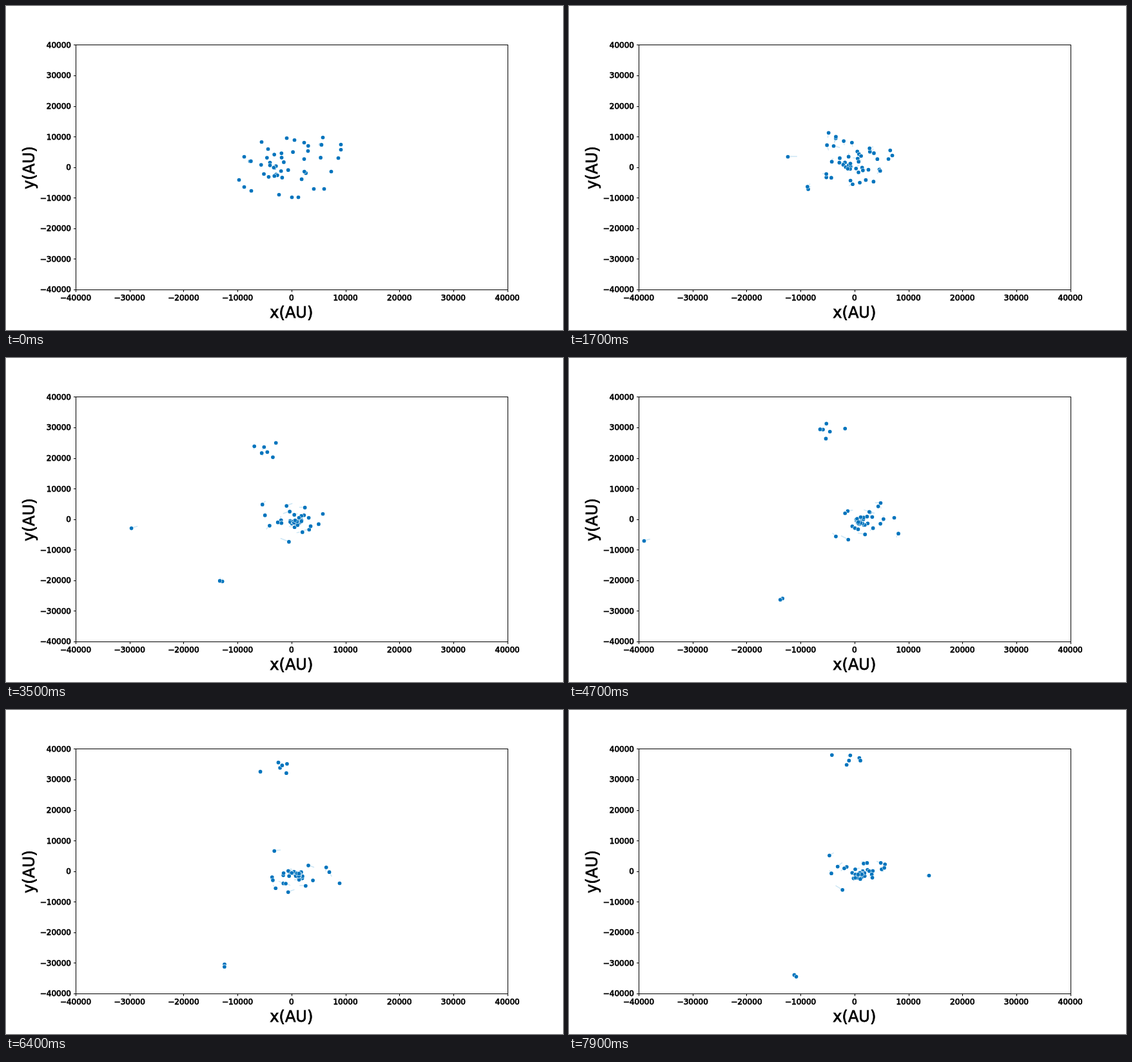
Recreate the animation shown at these times as an HTML page with a canvas. Size 864x504 px, loop 8000 ms.

```html
<!DOCTYPE html>
<html lang="en">
<head>
<meta charset="utf-8">
<title>Cluster collapse</title>
<style>
  html, body { margin: 0; width: 100%; height: 100%; overflow: hidden; background: #fff; }
  canvas { display: block; width: 864px; height: 504px; }
</style>
</head>
<body>
<canvas id="stage" width="864" height="504"></canvas>
<script>
const ctx = document.getElementById('stage').getContext('2d');
const LOOP = 8000, STEP = 100, TRAIL = 150;
const BOX = { l: 108, t: 60.48, w: 669.6, h: 380.52 };
const BLUE = '#0174bd';
const KNOT = [419, 247];
const INNER_STARS = 21;

// Outline of the cloud before it collapses.
const rim = [
  [519, 215], [515, 236], [504, 257], [493, 284], [477, 284], [453, 297], [443, 297],
  [423, 293], [380, 287], [369, 281], [361, 270], [369, 234], [396, 211], [406, 222],
  [435, 205], [447, 208], [462, 212], [488, 215], [491, 204]
];

let seed = 29;
function rand() {
  seed = (seed * 16807) % 2147483647;
  return seed / 2147483647;
}

const smooth = k => {
  k = Math.min(1, Math.max(0, k));
  return k * k * (3 - 2 * k);
};

// Smooth curve through [time, x, y] points, starting at rest.
function path(...pts) {
  const slope = (i, axis) => {
    if (i === 0) return 0;
    const a = pts[i - 1], b = pts[Math.min(i + 1, pts.length - 1)];
    return (b[axis] - a[axis]) / (b[0] - a[0]);
  };
  return t => {
    let i = 0;
    while (i < pts.length - 2 && t > pts[i + 1][0]) i++;
    const a = pts[i], b = pts[i + 1], d = b[0] - a[0];
    const u = (t - a[0]) / d, u2 = u * u, u3 = u2 * u;
    const at = axis =>
      (2 * u3 - 3 * u2 + 1) * a[axis] + (u3 - 2 * u2 + u) * d * slope(i, axis) +
      (3 * u2 - 2 * u3) * b[axis] + (u3 - u2) * d * slope(i + 1, axis);
    return [at(1), at(2)];
  };
}

function orbit(center, r, flat, phase, speed, skew = 0) {
  return t => {
    const [x, y] = center(t), a = phase + speed * t;
    return [x + r * Math.cos(a), y + r * flat * Math.sin(a + skew)];
  };
}

const core = t => {
  const drift = smooth((t - 1400) / 3000);
  return [438 + 13 * drift, 249 + 6 * drift];
};

// Falls from its start onto an orbit round the core; far stars take longer.
function boundStar(x, y) {
  const r = 3 + 62 * Math.pow(rand(), 1.8);
  const speed = (rand() < 0.5 ? -1 : 1) * 0.0105 / Math.sqrt(r);
  const round = orbit(core, r, 0.4 + 0.4 * rand(), rand() * 2 * Math.PI, speed, rand() * 1.6 - 0.8);
  const time = 1800 + 30 * Math.hypot(x - KNOT[0], y - KNOT[1]);
  return t => {
    const [ox, oy] = round(t), k = smooth(t / time);
    return [x + (ox - x) * k, y + (oy - y) * k];
  };
}

function makeStars() {
  const loner = path([0, 378, 241], [950, 405, 240], [1700, 339, 234],
    [2600, 257, 249], [4700, 116, 284], [7900, -90, 330]);
  const drifter = path([0, 519, 223], [1700, 501, 232], [3500, 491, 242],
    [4700, 504, 248], [6400, 517, 269], [7900, 558, 257]);
  const pair = path([0, 417, 250], [1700, 370, 282.5], [2600, 343, 320],
    [4700, 329, 374.5], [7900, 350.5, 413]);
  const group = path([0, 403, 243], [1000, 415, 243], [1700, 411, 208],
    [2600, 405, 169], [4700, 404, 111], [7900, 435, 73]);

  const list = [loner, drifter];
  for (let i = 0; i < 2; i++) list.push(orbit(pair, 2, 1, 2.3 + i * Math.PI, -0.0006));
  for (let i = 0; i < 6; i++) list.push(orbit(group, 6 + 4.5 * i, 0.5, i * 2.4, 0.003 / (1 + i)));
  for (const [x, y] of rim) list.push(boundStar(x, y));
  for (let i = 0; i < INNER_STARS; i++) {
    list.push(boundStar(432 + 62 * (rand() + rand() - 1), 243 + 56 * (rand() - 0.5)));
  }
  return list;
}
const stars = makeStars();

function label(text, x, y, size, align) {
  ctx.font = size + 'px "DejaVu Sans", sans-serif';
  ctx.textAlign = align;
  ctx.fillStyle = ctx.strokeStyle = '#000';
  ctx.lineWidth = 0.75;
  ctx.fillText(text, x, y);
  ctx.strokeText(text, x, y);
}

function line(x1, y1, x2, y2) {
  ctx.beginPath();
  ctx.moveTo(x1, y1);
  ctx.lineTo(x2, y2);
  ctx.stroke();
}

const snap = v => Math.floor(v + 0.5) + 0.5;

function drawAxes() {
  const left = snap(BOX.l), top = snap(BOX.t);
  const right = snap(BOX.l + BOX.w), bottom = snap(BOX.t + BOX.h);
  ctx.strokeStyle = '#000';
  ctx.lineWidth = 1;
  ctx.strokeRect(left, top, right - left, bottom - top);
  for (let i = 0; i <= 8; i++) {
    const value = String((i - 4) * 10000).replace('-', '\u2212');
    const x = BOX.l + BOX.w * i / 8, y = BOX.t + BOX.h * (1 - i / 8);
    ctx.lineWidth = 1;
    line(snap(x), bottom, snap(x), bottom + 3.5);
    line(left, snap(y), left - 3.5, snap(y));
    label(value, x, 458, 12, 'center');
    label(value, 101, Math.round(y + 4.4), 12, 'right');
  }
  label('x(AU)', 442.8, 485, 24, 'center');
  ctx.save();
  ctx.translate(44, 251.5);
  ctx.rotate(-Math.PI / 2);
  label('y(AU)', 0, 0, 24, 'center');
  ctx.restore();
}

function disc(x, y, r, color) {
  ctx.fillStyle = color;
  ctx.beginPath();
  ctx.arc(x, y, r, 0, 2 * Math.PI);
  ctx.fill();
}

function drawStars(t) {
  ctx.save();
  ctx.beginPath();
  ctx.rect(BOX.l, BOX.t, BOX.w, BOX.h);
  ctx.clip();
  ctx.strokeStyle = 'rgba(1, 130, 200, 0.2)';
  ctx.lineWidth = 1.5;
  for (const star of stars) line(...star(Math.max(0, t - TRAIL)), ...star(t));
  for (const star of stars) {
    const [x, y] = star(t);
    disc(x + 0.5, y + 0.5, 3.4, '#fff');
    disc(x + 0.5, y + 0.5, 2.85, BLUE);
  }
  ctx.restore();
}

function draw(now) {
  const t = Math.floor((now % LOOP) / STEP) * STEP;
  ctx.fillStyle = '#fff';
  ctx.fillRect(0, 0, 864, 504);
  drawStars(t);
  drawAxes();
}

let begin = null;
function tick(now) {
  if (begin === null) begin = now;
  draw(Math.max(0, now - begin));
  requestAnimationFrame(tick);
}
draw(0);
requestAnimationFrame(tick);
</script>
</body>
</html>
```
